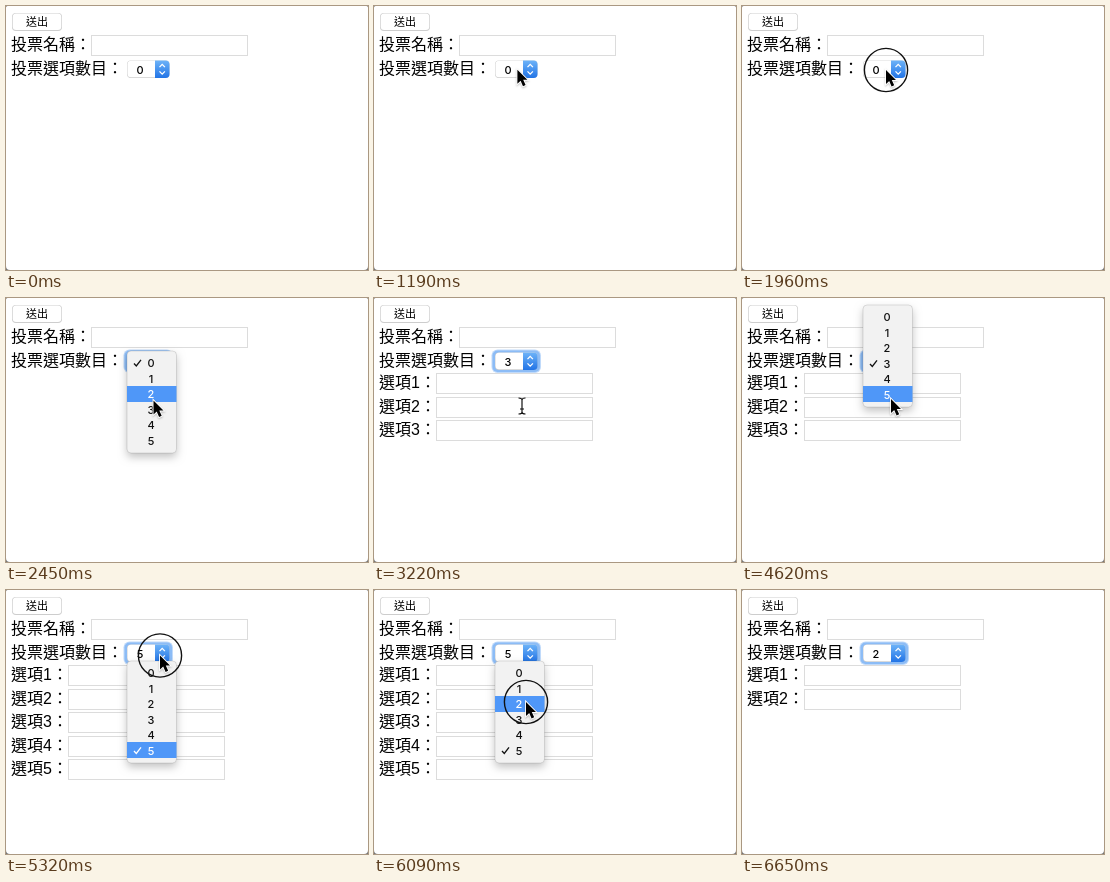
An HTML page with a canvas for the animation above (7490 ms loop, 362 by 264 pixels).

```html
<!DOCTYPE html>
<html lang="zh-Hant">
<head>
<meta charset="utf-8">
<title>投票</title>
<style>
  html, body { margin: 0; width: 100%; height: 100%; overflow: hidden; background: #fff; }
  canvas { display: block; width: 362px; height: 264px; }
</style>
</head>
<body>
<canvas id="stage"></canvas>
<script>
const W = 362, H = 264, LOOP = 7490, STEP = 70;
const canvas = document.getElementById('stage');
const ctx = canvas.getContext('2d');
const ratio = window.devicePixelRatio || 1;
canvas.width = W * ratio;
canvas.height = H * ratio;

const LABEL = '16px "Liberation Sans", "Noto Sans CJK TC", "Noto Sans CJK", sans-serif';
const BUTTON = '11px "Noto Sans CJK TC", "Noto Sans CJK", sans-serif';
const DIGIT = '500 11px Inter, Roboto, sans-serif';
const CHOICES = 6, ROW = 15.5, PAD = 4;
const MENU = { x: 121, w: 49.5, h: CHOICES * ROW + 2 * PAD + 1 };
const SELECT = { x: 121, y: 54.5, w: 42.5, h: 17.5 };
const INPUT = { w: 156, h: 20 };

// Each visit to the drop-down: press it, pick a value, menu closes
const visits = [
  { press: 1960, pick: 2940, close: 3150, value: 3 },
  { press: 3640, pick: 4480, close: 4690, value: 5 },
  { press: 5250, pick: 6090, close: 6370, value: 2 }
];
const ENTER = 70, LEAVE = 6650, FIRST_CLICK = 1330;

// Pointer moves; each one starts where the previous one ended
const moves = [
  { start: 0, end: 70, x: 118, y: 102 },
  { start: 70, end: 210, x: 24, y: 11 },
  { start: 210, end: 280, x: 43, y: 21 },
  { start: 560, end: FIRST_CLICK, x: 144, y: 64 },
  { start: 2240, end: 2660, x: 148, y: 108 },
  { start: 3220, end: 3640, x: 147, y: 67 },
  { start: 3920, end: 4200, x: 149, y: 101 },
  { start: 4760, end: 5040, x: 154, y: 65.5 },
  { start: 5460, end: 5880, x: 152, y: 112 },
  { start: 6300, end: LEAVE, x: 146, y: 255 }
];

const between = (t, a, b) => t >= a && t < b;
const easeOut = k => 1 - (1 - k) ** 3;
const inputTop = i => Math.round(75 + 23.5 * i);

function pointerAt(t) {
  const tip = { x: 0, y: 0 };
  for (const m of moves) {
    if (t < m.start) break;
    const k = easeOut(Math.min(1, (t - m.start) / (m.end - m.start)));
    tip.x += (m.x - tip.x) * k;
    tip.y += (m.y - tip.y) * k;
  }
  return tip;
}

const valueAt = t => visits.reduce((v, visit) => t >= visit.close ? visit.value : v, 0);

function clicking(t) {
  return between(t, FIRST_CLICK, FIRST_CLICK + STEP) ||
    visits.some(v => [v.press, v.pick].some(c => between(t, c, c + 2 * STEP)));
}

// The checked row covers the control, or the menu drops below when there is no room
function menuTop(checked) {
  const top = Math.round(53 - checked * ROW);
  return top < 0 ? 71 : top;
}

function text(str, x, y, font, color = '#000', align = 'left') {
  ctx.font = font;
  ctx.fillStyle = color;
  ctx.textAlign = align;
  ctx.fillText(str, x, y);
}

function box(x, y, w, h, r, fill) {
  ctx.beginPath();
  ctx.roundRect(x, y, w, h, r);
  ctx.fillStyle = fill;
  ctx.fill();
}

function line(points, color, width) {
  ctx.beginPath();
  points.forEach(([x, y]) => ctx.lineTo(x, y));
  ctx.strokeStyle = color;
  ctx.lineWidth = width;
  ctx.stroke();
}

function shadow(color, blur, dy) {
  ctx.shadowColor = color;
  ctx.shadowBlur = blur * ratio;
  ctx.shadowOffsetY = dy * ratio;
}

function drawInput(x, y) {
  ctx.strokeStyle = '#dcdcdc';
  ctx.lineWidth = 1;
  ctx.strokeRect(x + .5, y + .5, INPUT.w, INPUT.h);
}

function drawButton() {
  box(6, 7, 50, 18, 4, '#cdcdcd');
  box(6.7, 7.5, 48.6, 16.6, 3.5, '#fff');
  text('送出', 31, 20, BUTTON, '#000', 'center');
}

function drawSelect(value, focused) {
  const { x, y, w, h } = SELECT;
  if (focused) {
    box(x - 3.5, y - 3, w + 7, h + 6, 6, '#c0dafa');
    box(x - 2.5, y - 2, w + 5, h + 4, 5, '#8cbcf6');
  }
  box(x, y, w, h, 4, '#cdcdcd');
  box(x + .5, y + .3, w - 1, h - 1, 3.5, '#fff');
  const blue = ctx.createLinearGradient(0, y, 0, y + h);
  blue.addColorStop(0, '#6db3f8');
  blue.addColorStop(1, '#2274e6');
  box(x + 28, y, w - 28, h, [0, 4, 4, 0], blue);
  const cx = x + 35.2, cy = y + h / 2;
  for (const s of [-1, 1]) {
    line([[cx - 2.7, cy + 2.1 * s], [cx, cy + 4.9 * s], [cx + 2.7, cy + 2.1 * s]], '#fff', 1.3);
  }
  text(value, x + 13, y + 13, DIGIT, '#000', 'center');
}

function drawMenu(checked, blinking, tip) {
  const { x, w, h } = MENU;
  const top = menuTop(checked);
  ctx.save();
  shadow('rgba(0,0,0,.24)', 9, 4);
  box(x, top, w, h, 4, '#f2f2f2');
  ctx.restore();
  ctx.strokeStyle = 'rgba(0,0,0,.14)';
  ctx.lineWidth = .8;
  ctx.stroke();

  const hover = Math.floor((tip.y - top - PAD) / ROW);
  const active = blinking ? -1 : hover < 0 ? checked : hover;
  for (let i = 0; i < CHOICES; i++) {
    const y = top + PAD + i * ROW;
    const color = i === active ? '#fff' : '#111';
    if (i === active) {
      ctx.fillStyle = '#4f97f8';
      ctx.fillRect(x, Math.floor(y), w, Math.ceil(ROW));
    }
    text(i, x + 24, y + 12, DIGIT, color, 'center');
    if (i === checked) {
      line([[x + 7, y + 8.5], [x + 9.3, y + 11], [x + 14, y + 4.8]], color, 1.3);
    }
  }
}

function drawArrow({ x, y }) {
  ctx.save();
  ctx.translate(x, y);
  const shape = new Path2D('M0 0V14L3.2 11L5.6 16.5L8.2 15.3L5.8 10H10Z');
  shadow('rgba(0,0,0,.25)', 2, 1);
  ctx.strokeStyle = '#fff';
  ctx.lineWidth = 1.8;
  ctx.stroke(shape);
  ctx.shadowColor = 'transparent';
  ctx.fillStyle = '#000';
  ctx.fill(shape);
  ctx.restore();
}

function drawBeam({ x, y }) {
  ctx.save();
  ctx.translate(x, y);
  ctx.beginPath();
  for (const s of [-1, 1]) {
    ctx.moveTo(-3.5, 8 * s);
    ctx.quadraticCurveTo(0, 8 * s, 0, 6 * s);
    ctx.quadraticCurveTo(0, 8 * s, 3.5, 8 * s);
  }
  ctx.moveTo(0, -6.5);
  ctx.lineTo(0, 6.5);
  ctx.moveTo(-2, 3);
  ctx.lineTo(2, 3);
  ctx.strokeStyle = '#111';
  ctx.lineWidth = 1.2;
  ctx.stroke();
  ctx.restore();
}

function drawRing({ x, y }) {
  ctx.beginPath();
  ctx.arc(x, y, 21.6, 0, Math.PI * 2);
  ctx.strokeStyle = '#111';
  ctx.lineWidth = 1.4;
  ctx.stroke();
}

function drawCorners() {
  ctx.beginPath();
  ctx.rect(0, 0, W, H);
  ctx.roundRect(0, 0, W, H, [1.5, 1.5, 4, 4]);
  ctx.fillStyle = '#777';
  ctx.fill('evenodd');
}

function draw(t) {
  const tip = pointerAt(t);
  const count = valueAt(t);
  const visit = visits.find(v => between(t, v.press + STEP, v.close));
  const inputs = [[85, 29]];
  for (let i = 0; i < count; i++) inputs.push([62, inputTop(i)]);

  ctx.setTransform(ratio, 0, 0, ratio, 0, 0);
  ctx.fillStyle = '#fff';
  ctx.fillRect(0, 0, W, H);

  drawButton();
  text('投票名稱：', 5, 44, LABEL);
  text('投票選項數目：', 5, 68, LABEL);
  for (let i = 0; i < count; i++) text(`選項${i + 1}：`, 5, inputTop(i) + 15, LABEL);
  inputs.forEach(([x, y]) => drawInput(x, y));
  drawSelect(count, t >= visits[0].press + STEP);
  if (visit) drawMenu(count, t === visit.pick + STEP, tip);
  if (clicking(t)) drawRing(tip);

  if (between(t, ENTER, LEAVE)) {
    const overInput = inputs.some(([x, y]) =>
      between(tip.x, x, x + INPUT.w) && between(tip.y, y, y + INPUT.h));
    if (overInput && !visit) drawBeam(tip);
    else drawArrow(tip);
  }
  drawCorners();
}

function frame() {
  const t = performance.now() % LOOP;
  draw(Math.floor(t / STEP) * STEP);
  requestAnimationFrame(frame);
}
frame();
</script>
</body>
</html>
```
